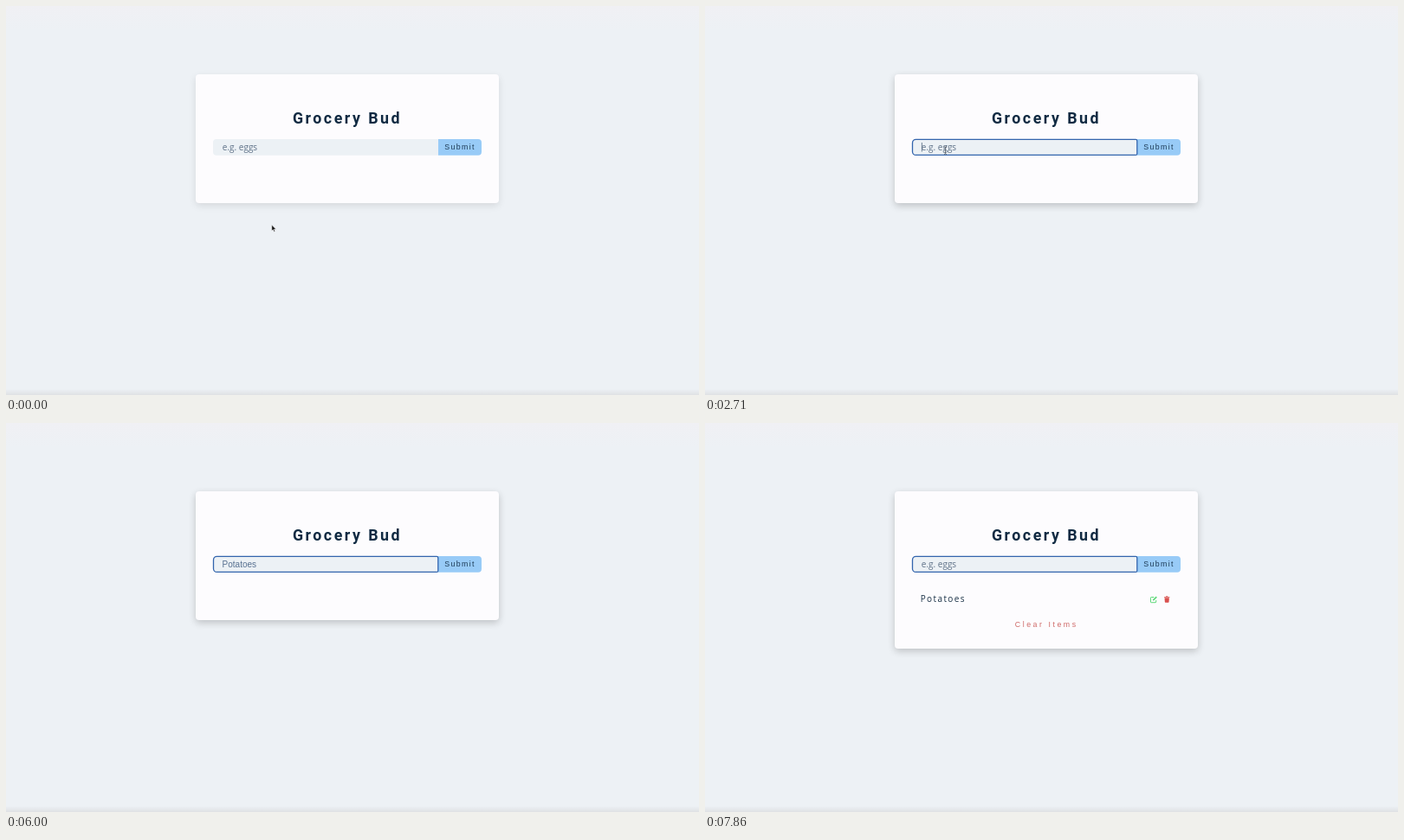
An HTML page for the animation above (8 s loop, 800 by 450 pixels).

```html
<!DOCTYPE html>
<html lang="en">
<head>
<meta charset="utf-8">
<title>Grocery list</title>
<style>
  html, body { margin: 0; width: 100%; height: 100%; overflow: hidden; }
  body { position: relative; background: linear-gradient(#f0f0f4, #edf1f5 28px); }
  #floor {
    position: absolute; left: 0; top: 443px; width: 800px; height: 7px;
    background: linear-gradient(#dfe1e400, #dfe1e4);
  }
  #card {
    position: absolute; left: 219px; top: 79px; width: 350px;
    border-radius: 4px; background: #fdfcfe;
  }
  svg { position: absolute; left: 0; top: 0; }
  text { white-space: pre; }
  .sans { font-family: "Open Sans", sans-serif; }
  .arial { font-family: "Liberation Sans", Arial, sans-serif; }
  #title { font: bold 17.8px Roboto, sans-serif; letter-spacing: 2.5px; fill: #102a42; }
  #submit { font-size: 8.75px; letter-spacing: 1.4px; fill: #1d3a55; }
  #placeholder { font-size: 10px; fill: #5f7288; }
  #typed { font-size: 10px; fill: #577090; }
  #alert text { font-size: 7px; letter-spacing: 2.6px; fill: #35573f; }
  #item { font-size: 10px; letter-spacing: 1.4px; fill: #1b3247; }
  #clear { font-size: 8.75px; letter-spacing: 2.55px; fill: #cf6a68; }
</style>
</head>
<body>
<div id="floor"></div>
<div id="card"></div>
<svg width="800" height="450" viewBox="0 0 800 450">
  <g id="alert">
    <rect x="239" y="99" width="310" height="12.5" rx="2" fill="#cde8d3"/>
    <text class="sans" x="328" y="107.9">Item Added To The List</text>
  </g>
  <text id="title" x="331" y="136.3">Grocery Bud</text>

  <path d="M499 154H243a4 4 0 0 0 -4 4v10.7a4 4 0 0 0 4 4H499z" fill="#ecf1f5"/>
  <path d="M499 154H545a4 4 0 0 1 4 4v10.7a4 4 0 0 1 -4 4H499z" fill="#98cbf7"/>
  <text id="submit" class="arial" x="506.2" y="166.4">Submit</text>
  <path id="focus" fill="none" stroke="#3264ad" stroke-width="1.3"
    d="M243.5 154.4H497.3q1.5 0 1.5 1.5v15q0 1.5 -1.5 1.5H243.5a4 4 0 0 1 -4 -4v-10a4 4 0 0 1 4 -4z"/>
  <text id="placeholder" class="sans" x="249.8" y="166.7">e.g. eggs</text>
  <text id="typed" class="arial" x="249.6" y="166.8"></text>
  <rect id="caret" y="158" width=".8" height="10.5" fill="#52657c"/>

  <g id="list">
    <text id="item" class="sans" x="248.7" y="206.5">Potatoes</text>
    <g fill="none" stroke="#5fd97a" stroke-width="1">
      <path d="M518.3 201.5H515.2q-.7 0 -.7 .7v4.8q0 .7 .7 .7h4.8q.7 0 .7 -.7v-2"/>
      <path d="M517.3 205.2l4 -4" stroke-width="1.7"/>
    </g>
    <path d="M530 200.9h1.9l.5 -.6h1.6l.5 .6h1.9v.8h-6.4zM530.5 202.2h5.4l-.35 4.9q-.05 .7 -.75 .7h-3.2q-.7 0 -.75 -.7z" fill="#d9504e"/>
    <text id="clear" class="arial" x="357.8" y="236">Clear Items</text>
  </g>

  <path id="arrow" d="M0 0V6.8L1.6 5.4L2.7 7.9L3.8 7.4L2.7 5H4.9z" fill="#111" stroke="#fff" stroke-width=".5"/>
  <path id="beam" d="M-1.5 -4.3Q0 -4.3 0 -3.3Q0 -4.3 1.5 -4.3M0 -3.3V3.5M-1.5 4.5Q0 4.5 0 3.5Q0 4.5 1.5 4.5" fill="none" stroke="#555b63" stroke-width=".8"/>
</svg>
<script>
  const LOOP = 8000, WORD = "Potatoes";
  const FOCUS = 2570, ADDED = 6140, ALERT_END = 7140, ENTER_CARD = 2290;
  const keyTimes = [3430, 3710, 4000, 4140, 4570, 4710, 4860, 5140];
  // Pointer path: time, x, y
  const path = [[1720, 306.8, 253.3], [2000, 305, 250], [2140, 302.3, 243.7],
                [2290, 296, 226], [2430, 285, 189], [2570, 278, 167.5], [2710, 277.5, 167]];

  const $ = id => document.getElementById(id);
  const clamp = (v, lo, hi) => Math.min(hi, Math.max(lo, v));
  const show = (id, on) => $(id).style.display = on ? "" : "none";

  function pointerAt(time) {
    const t = clamp(time, path[0][0], path.at(-1)[0]);
    const i = Math.max(1, path.findIndex(p => p[0] >= t));
    const [t0, x0, y0] = path[i - 1], [t1, x1, y1] = path[i];
    const k = (t - t0) / (t1 - t0);
    return [x0 + (x1 - x0) * k, y0 + (y1 - y0) * k];
  }

  function draw(t) {
    const added = t >= ADDED, focused = t >= FOCUS;
    const typed = added ? "" : WORD.slice(0, keyTimes.filter(k => t >= k).length);
    $("typed").textContent = typed;
    show("placeholder", !typed);
    show("focus", focused);
    show("alert", added && t < ALERT_END);
    show("list", added);

    // The caret blink restarts at every input event.
    const lastInput = Math.max(...[FOCUS, ...keyTimes, ADDED].filter(k => t >= k));
    show("caret", focused && (t - lastInput) % 1000 < 500);
    const width = typed ? $("typed").getComputedTextLength() : 0;
    $("caret").setAttribute("x", 249.9 + width);

    const hover = clamp((t - ENTER_CARD) / 300, 0, 1);
    $("card").style.height = (added ? 181.5 : 149) + "px";
    $("card").style.boxShadow = `0 3px 9px rgba(0,0,0,${0.1 + 0.1 * hover})`;

    // The pointer is sampled seven times a second.
    const sample = Math.floor((t + 5) * 7 / 1000) * 1000 / 7;
    const [x, y] = pointerAt(sample), inInput = y < 172;
    show("arrow", !inInput);
    show("beam", inInput && t < keyTimes[0]);
    for (const id of ["arrow", "beam"]) $(id).setAttribute("transform", `translate(${x} ${y})`);
  }

  function tick() {
    draw(performance.now() % LOOP);
    requestAnimationFrame(tick);
  }
  tick();
</script>
</body>
</html>
```
